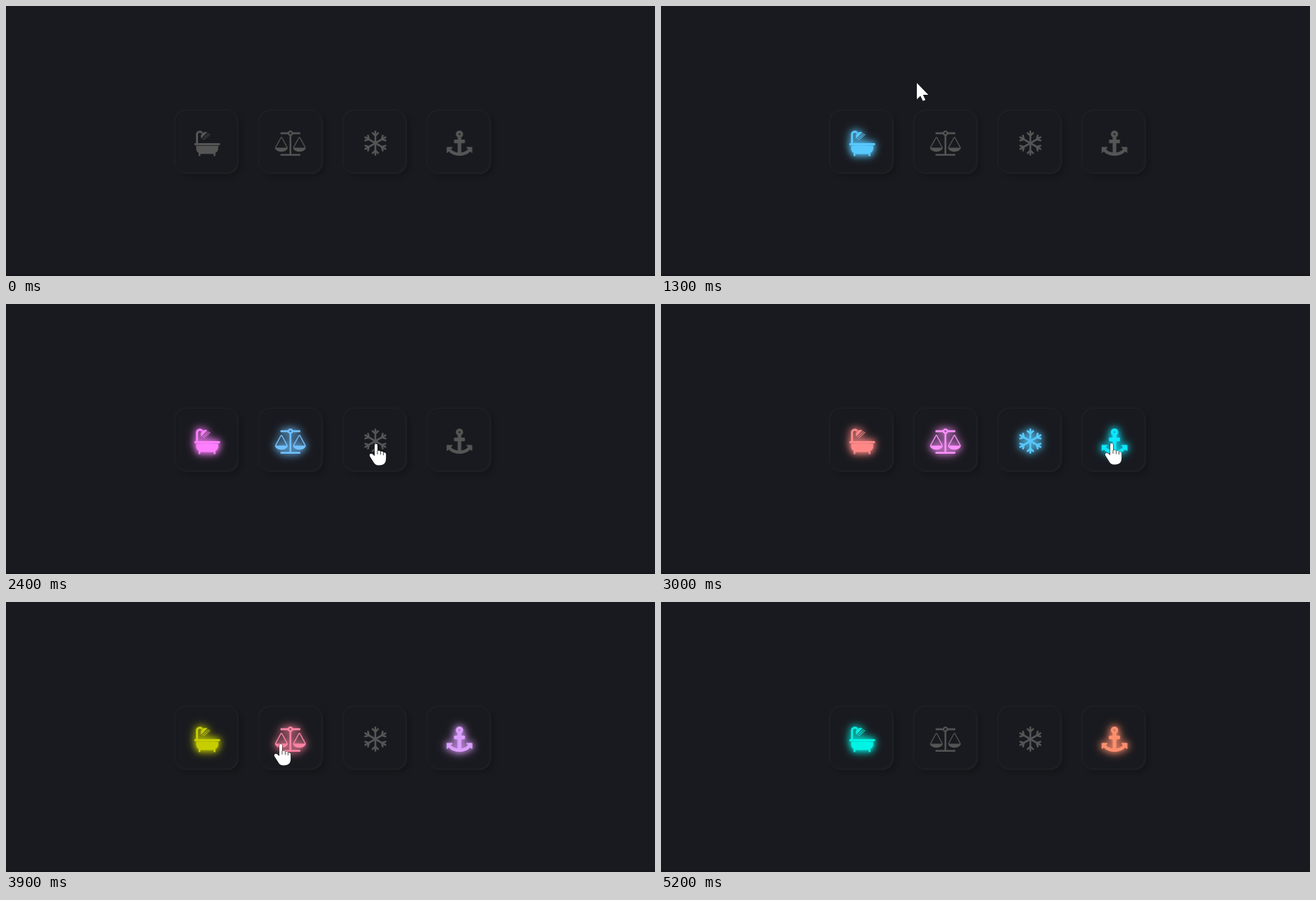
These frames come from a looping animation (926x386 px, 5.3 s). An HTML page without scripts:

```html
<!DOCTYPE html>
<html lang="en">
<head>
<meta charset="utf-8">
<title>Glowing icon switches</title>
<style>
  html, body { margin: 0; width: 100%; height: 100%; overflow: hidden; background: #191a1f; }
  body { position: relative; }
  body::after { content: ""; position: absolute; inset: 384px 0 0; background: #151519; }
  svg { position: absolute; left: 0; top: 0; }

  .tile {
    position: absolute; left: calc(242px + 120px * var(--i)); top: 150px;
    width: 90px; height: 90px; border-radius: 16px; background: #191a1f;
    box-shadow: -1px -1px 4px rgba(255,255,255,.05), 4px 4px 6px rgba(0,0,0,.2),
      inset -1px -1px 4px rgba(255,255,255,.05), inset 1px 1px 1px rgba(0,0,0,.1);
  }

  .icon { color: #555; fill: currentColor; fill-rule: evenodd; }
  .line { fill: none; stroke: currentColor; }

  /* Each colour cycle starts when its icon is switched on. */
  .lit {
    color: #0ef; fill: currentColor; visibility: hidden;
    animation: hue 5.3s steps(53) var(--on) infinite, var(--switch) 5.3s step-end infinite;
  }
  .lit use { filter: url(#glow); }
  @keyframes hue { from { filter: hue-rotate(0deg); } to { filter: hue-rotate(424deg); } }
  @keyframes bath { 0% { visibility: hidden; } 14.717%, 100% { visibility: visible; } }
  @keyframes scales { 0%, 75.094%, 100% { visibility: hidden; } 33.585% { visibility: visible; } }
  @keyframes snow { 0%, 65.66%, 100% { visibility: hidden; } 46.792% { visibility: visible; } }
  @keyframes anchor { 0% { visibility: hidden; } 54.34%, 100% { visibility: visible; } }

  .pointer {
    --arrow: 0; --hand: 0;
    animation: move 5.3s infinite, pose 5.3s step-end infinite;
  }
  .pointer path { fill: #fff; stroke: #111; paint-order: stroke; }
  .arrow { opacity: var(--arrow); }
  .hand { opacity: var(--hand); }
  .pointer .crease { fill: none; stroke-width: .9; stroke: #333; }

  @keyframes move {
    0%, 1.509% { transform: translate(786px, 89px); animation-timing-function: steps(3); }
    7.17% { transform: translate(420px, 165px); animation-timing-function: steps(2); }
    10.943%, 18.491% { transform: translate(273px, 193px); animation-timing-function: steps(2); }
    22.264% { transform: translate(318px, 122px); animation-timing-function: steps(1); }
    24.151% { transform: translate(365px, 110px); animation-timing-function: steps(2); }
    27.925% { transform: translate(423px, 207px); animation-timing-function: steps(2); }
    31.698%, 35.472% { transform: translate(420px, 204px); animation-timing-function: steps(2); }
    39.245% { transform: translate(588px, 203px); animation-timing-function: steps(3); }
    44.906%, 46.792% { transform: translate(528px, 200px); animation-timing-function: steps(2); }
    50.566%, 60% { transform: translate(643px, 199px); animation-timing-function: steps(2); }
    63.774%, 65.66% { transform: translate(525px, 203px); animation-timing-function: steps(3); }
    71.321%, 75.094% { transform: translate(392px, 203px); animation-timing-function: steps(2); }
    78.868% { transform: translate(466px, 224px); animation-timing-function: steps(3); }
    84.528% { transform: translate(855px, 141px); animation-timing-function: steps(1); }
    86.415%, 100% { transform: translate(910px, 101px); }
  }
  @keyframes pose {
    0%, 88.302%, 100% { --arrow: 0; --hand: 0; }
    1.509%, 9.057%, 22.264%, 39.245%, 48.679%, 61.887%, 78.868% { --arrow: 1; --hand: 0; }
    7.17%, 10.943%, 26.038%, 41.132%, 50.566%, 63.774% { --arrow: 0; --hand: 1; }
  }
</style>
</head>
<body>
<div class="tile" style="--i:0"></div>
<div class="tile" style="--i:1"></div>
<div class="tile" style="--i:2"></div>
<div class="tile" style="--i:3"></div>

<svg width="926" height="386" viewBox="0 0 926 386">
  <defs>
    <filter id="glow" filterUnits="userSpaceOnUse" x="-50" y="-50" width="140" height="140" color-interpolation-filters="sRGB">
      <feGaussianBlur in="SourceGraphic" stdDeviation="7.5" result="wide"/>
      <feGaussianBlur in="SourceGraphic" stdDeviation="5" result="near"/>
      <feMerge>
        <feMergeNode in="wide"/><feMergeNode in="near"/><feMergeNode in="SourceGraphic"/>
      </feMerge>
    </filter>

    <g id="bath">
      <rect y="18" width="36.5" height="3.2" rx="1"/>
      <path d="M2.5 21.9H34v3.6q0 4-4 6.5v4.5h-2.5v-3H8.5v3H6V32q-3.5-2.5-3.5-6.5z"/>
      <path class="line" stroke-width="3" d="M3.7 18.5V5.5a4 4 0 0 1 7.3-2"/>
      <path d="M9.5 11.5q-1.2-4.5 1.3-7.3 3-3 7.7-1.7z"/>
      <path class="line" stroke-width="1.2" stroke-dasharray="1.5 1" d="M11.5 12.4l8.5-8M13.7 13.4l8.5-8"/>
    </g>

    <path id="pan" d="M1728 448l-384 704h768zM2176 1152q0 73-46.5 131t-117.5 91-144.5 49.5-139.5 16.5-139.5-16.5-144.5-49.5-117.5-91-46.5-131q0-11 35-81t92-174.5 107-195.5 102-184 56-100q18-33 56-33t56 33q4 7 56 100t102 184 107 195.5 92 174.5 35 81z"/>
    <g id="scales">
      <g transform="translate(0 1.3) scale(.02009)">
        <path d="M1269 192q-14 40-45.5 71.5t-71.5 45.5v1291h608q14 0 23 9t9 23v64q0 14-9 23t-23 9H416q-14 0-23-9t-9-23v-64q0-14 9-23t23-9h608V309q-40-14-71.5-45.5T907 192H416q-14 0-23-9t-9-23V96q0-14 9-23t23-9h491q21-57 70-92.5t111-35.5 111 35.5 70 92.5h491q14 0 23 9t9 23v64q0 14-9 23t-23 9zM1168 128a80 80 0 1 0-160 0 80 80 0 1 0 160 0z"/>
        <use href="#pan"/>
        <use href="#pan" x="-1280"/>
      </g>
    </g>

    <path id="arm" class="line" stroke-width="2.6" stroke-linecap="round" d="M0 0V-16.7M-4-14.4L0-10.6 4-14.4"/>
    <g id="snow" transform="translate(18 18)">
      <use href="#arm"/>
      <use href="#arm" transform="rotate(60)"/>
      <use href="#arm" transform="rotate(120)"/>
      <use href="#arm" transform="rotate(180)"/>
      <use href="#arm" transform="rotate(240)"/>
      <use href="#arm" transform="rotate(300)"/>
    </g>

    <g id="anchor">
      <path transform="scale(.0204)" d="M960 256a64 64 0 1 0-128 0 64 64 0 1 0 128 0zM1792 1184v352q0 22-20 30-20 6-35-7l-93-93q-119 143-318.5 226.5T896 1776t-429.5-83.5T148 1466l-93 93q-15 13-35 7-20-8-20-30v-352q0-32 32-32h352q22 0 30 20 8 19-7 35l-100 100q67 91 189.5 153.5T768 1543V896H576q-64 0-64-64V704q0-64 64-64h192V477q-58-34-93-92.5T640 256a256 256 0 0 1 512 0q0 70-35 128.5T1024 477v163h192q64 0 64 64v128q0 64-64 64h-192v647q149-20 271.5-82.5T1485 1307l-100-100q-15-16-7-35 8-20 30-20h352q32 0 32 32z"/>
    </g>
  </defs>

  <g class="icon" transform="translate(268.8 178)">
    <use href="#bath"/>
    <g class="lit" style="--on:.78s;--switch:bath"><use href="#bath"/></g>
  </g>
  <g class="icon" transform="translate(383.9 178)">
    <use href="#scales"/>
    <g class="lit" style="--on:1.78s;--switch:scales"><use href="#scales"/></g>
  </g>
  <g class="icon" transform="translate(509 178)">
    <use href="#snow"/>
    <g class="lit" style="--on:2.48s;--switch:snow"><use href="#snow"/></g>
  </g>
  <g class="icon" transform="translate(628.7 178)">
    <use href="#anchor"/>
    <g class="lit" style="--on:2.88s;--switch:anchor"><use href="#anchor"/></g>
  </g>

  <g class="pointer">
    <path class="arrow" d="M0 0V23.5l5.2-5 3.5 7.3 3.6-1.6-3.5-7.2h7.7z"/>
    <g class="hand">
      <path d="M-2 2a2 2 0 0 1 4 0v8q3.4-1 4.4 1 3-.6 4 1.2 3.8-.4 3.8 2.8v6q0 9-8.5 9.5h-3q-3.5 0-6-4l-5.7-9q-1-3 2-3.4 2.2 0 5 3.4z"/>
      <path class="crease" d="M2 10v5M6.4 11v4.5M10.4 12.2v4"/>
    </g>
  </g>
</svg>
</body>
</html>
```
